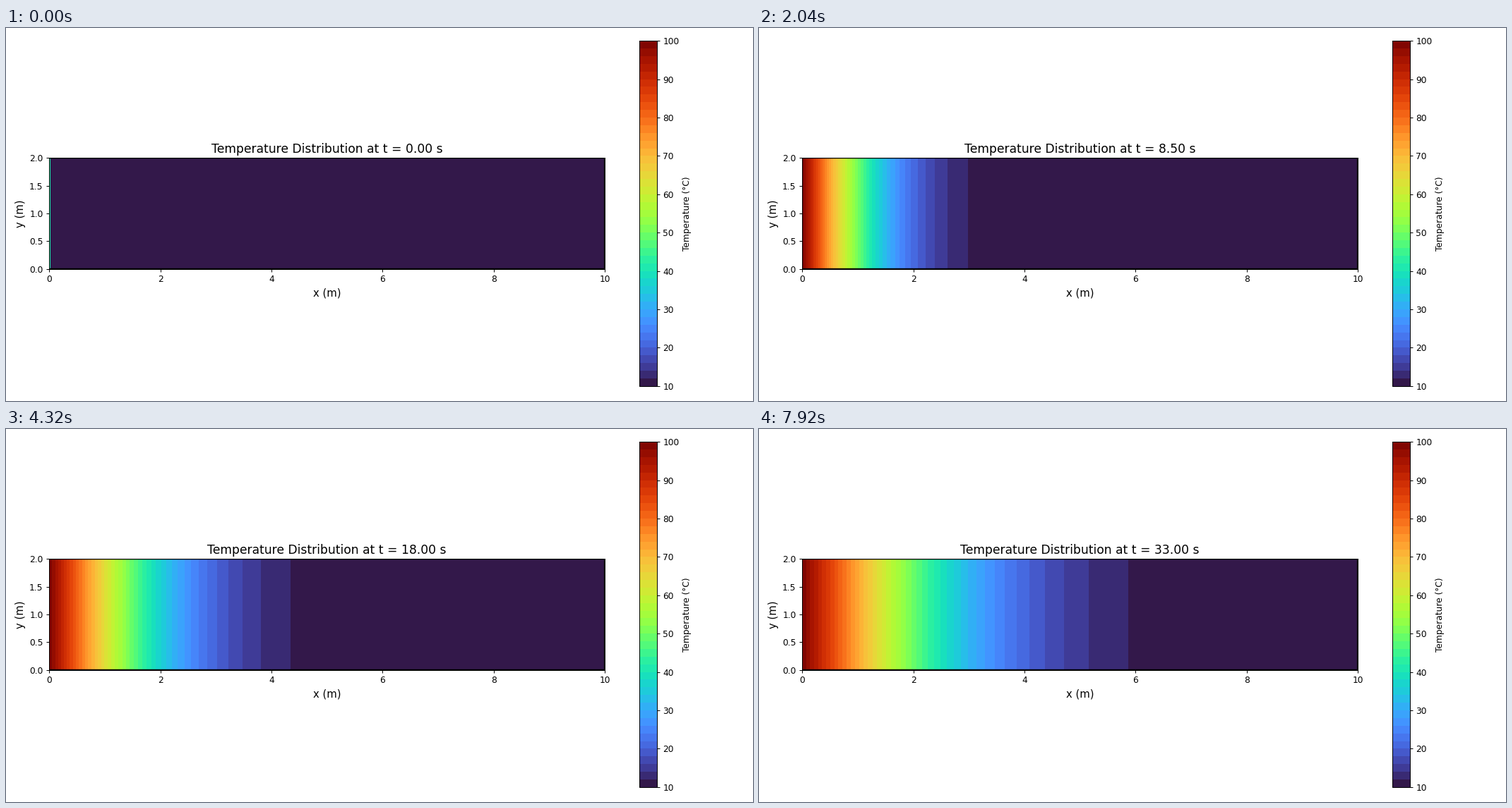
Write a matplotlib script that moves like this. It is 1058 px wide and 529 px high and loops after 8000 ms.

```python
import math

import matplotlib.pyplot as plt
import numpy as np
from matplotlib.animation import FuncAnimation

LENGTH, HEIGHT = 10.0, 2.0
T_COLD, T_HOT = 10.0, 100.0
DIFFUSIVITY = 0.1
DT = 0.5              # simulated seconds per step
TICKS_PER_STEP = 3    # each step stays for 120 ms
INTERVAL = 40
FRAMES = 200

x = np.linspace(0, LENGTH, 401)
y = np.linspace(0, HEIGHT, 3)
levels = np.linspace(T_COLD, T_HOT, 46)


def temperature(t):
    """Semi-infinite slab with a hot left wall."""
    spread = 2 * math.sqrt(DIFFUSIVITY * t) if t > 0 else 1e-9
    row = [T_COLD + (T_HOT - T_COLD) * math.erfc(v / spread) for v in x]
    return np.tile(row, (len(y), 1))


def draw_field(t):
    return ax.contourf(x, y, temperature(t), levels=levels, cmap="turbo")


plt.rcParams["font.family"] = "DejaVu Sans"
fig, ax = plt.subplots(figsize=(12, 6), dpi=1058.0001 / 12)
field = draw_field(0)
shown = 0

bar = fig.colorbar(field, ax=ax, label="Temperature (°C)")
bar.set_ticks(range(10, 101, 10))
ax.set_aspect("equal")
ax.set_xlim(0, LENGTH)
ax.set_ylim(0, HEIGHT)
ax.set_xlabel("x (m)", fontsize=12)
ax.set_ylabel("y (m)", fontsize=12)
title = ax.set_title("Temperature Distribution at t = 0.00 s", fontsize=14)
ax.plot([0, LENGTH, LENGTH, 0], [0, 0, HEIGHT, HEIGHT], color="black", lw=2)
fig.tight_layout()


def update(frame):
    global field, shown
    step = frame // TICKS_PER_STEP
    if step != shown:
        field.remove()
        field = draw_field(step * DT)
        shown = step
        title.set_text(f"Temperature Distribution at t = {step * DT:.2f} s")
    return field, title


anim = FuncAnimation(fig, update, frames=FRAMES, interval=INTERVAL, repeat=True)
plt.show()
```
